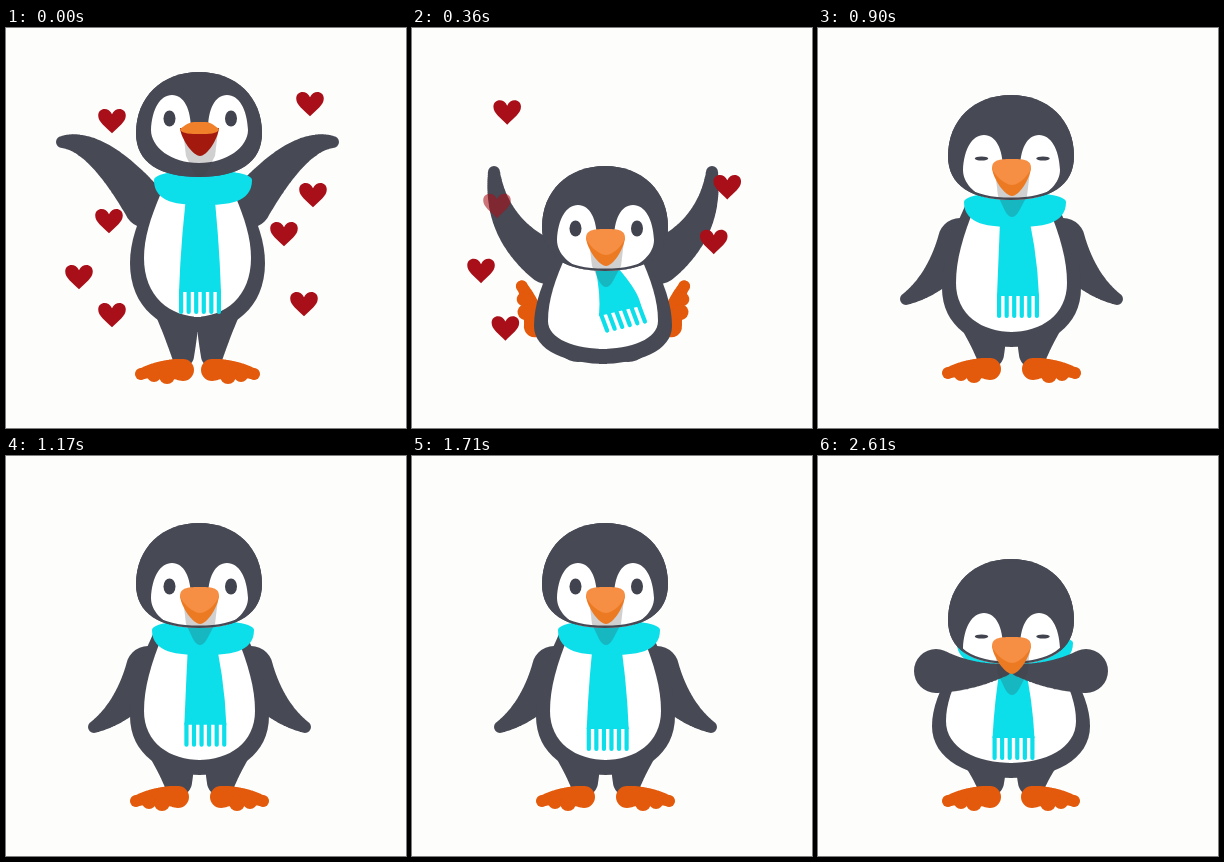
Recreate the animation shown at these times as an HTML page with a canvas. Size 400 by 400 pixels, loop 2700 ms.

```html
<!DOCTYPE html>
<html lang="en">
<head>
<meta charset="utf-8">
<title>Happy penguin</title>
<style>
html, body { margin: 0; width: 100%; height: 100%; overflow: hidden; background: #fdfdfb; }
canvas { display: block; width: 400px; height: 400px; }
</style>
</head>
<body>
<canvas id="stage" width="400" height="400"></canvas>
<script>
const ctx = document.getElementById('stage').getContext('2d');
const LOOP = 2700, STEP = 90;
const PAPER = '#fdfdfb', DARK = '#474955', CYAN = '#0cdeea', FOOT = '#e35a0c', HEART = '#a90f19';

// Key points of the left half, mirrored around `axis`.
const up = {
  axis: [191.5], head: [-23], face: [-40], open: [1], collar: [159, 49],
  shoulder: [145, 165], side: [124, 235], base: [304], ankle: [177, 328, 11],
  arm: [140, 178], bend: [92, 111], hand: [56, 114],
  foot: [159, 343, 0], tail: [194, 264, 0]
};
const tuck = {
  axis: [191], head: [71], face: [70], open: [0], collar: [205, 49],
  shoulder: [145, 225], side: [122, 298], base: [336], ankle: [172, 316, 14],
  arm: [135, 234], bend: [84, 202], hand: [82, 144],
  foot: [118, 281, 1.35], tail: [208, 288, -10]
};
const land = {
  axis: [191.5], head: [59], face: [71], open: [0], collar: [195, 49],
  shoulder: [132, 200], side: [118, 268], base: [318], ankle: [170, 325, 14],
  arm: [136, 226], bend: [112, 270], hand: [64, 281],
  foot: [153, 340, -.17], tail: [187, 297, 0]
};
const idle = {
  axis: [193.5], head: [0], face: [0], open: [0], collar: [181, 51],
  shoulder: [147, 178], side: [124, 260], base: [319], ankle: [172, 326, 14],
  arm: [142, 212], bend: [122, 254], hand: [88, 271],
  foot: [154, 342, 0], tail: [200, 268, 0]
};
const rest = { ...idle, tail: [194, 275, 0] };
const hug = {
  axis: [193], head: [36], face: [50], open: [0], collar: [194, 58],
  shoulder: [135, 210], side: [114, 270], base: [322], ankle: [172, 326, 14],
  arm: [118, 215], bend: [150, 222], hand: [187, 214],
  foot: [154, 342, 0], tail: [195.5, 282, 0]
};
const keys = [[0, up], [360, tuck], [540, land], [810, idle], [900, idle],
  [2160, rest], [2250, rest], [2610, hug], [LOOP, up]];
const blinks = [900, 1440, 2610];

// x, y, drift per second, time of vanishing
const hearts = [
  [106, 93, -30, -24, 660], [304, 76, 30, -27, 300], [307, 167, 23, -22, 690], [278, 206, 66, 22, 500],
  [298, 276, 33, 28, 330], [103, 193, -50, -42, 412], [73, 249, -11, -17, 480], [106, 287, -35, 37, 640]
];

const clamp = v => Math.max(0, Math.min(1, v));
const mix = (a, b, k) => a.map((v, i) => v + (b[i] - v) * k);

function poseAt(t) {
  const i = keys.findIndex(([end]) => end > t);
  const [t0, a] = keys[i - 1], [t1, b] = keys[i];
  const k = (1 - Math.cos(Math.PI * (t - t0) / (t1 - t0))) / 2;
  return Object.fromEntries(Object.keys(a).map(part => [part, mix(a[part], b[part], k)]));
}

function fill(path, color) {
  ctx.fillStyle = color;
  ctx.fill(typeof path === 'string' ? new Path2D(path) : path);
}

function oval(x, y, rx, ry, color) {
  const p = new Path2D();
  p.ellipse(x, y, rx, ry, 0, 0, 7);
  fill(p, color);
}

// Rounded, tapering shape swept along a quadratic curve.
function limb([x0, y0], [x1, y1], [x2, y2], r0, r1, color) {
  const p = new Path2D(), n = 60;
  for (let i = 0; i <= n; i++) {
    const k = i / n, j = 1 - k, r = r0 * j + r1 * k;
    const x = j * j * x0 + 2 * j * k * x1 + k * k * x2;
    const y = j * j * y0 + 2 * j * k * y1 + k * k * y2;
    p.moveTo(x + r, y);
    p.arc(x, y, r, 0, 7);
  }
  fill(p, color);
}

function both(axis, draw) {
  draw();
  ctx.save();
  ctx.translate(2 * axis, 0);
  ctx.scale(-1, 1);
  draw();
  ctx.restore();
}

// Left half of an egg, from shoulder over the widest point to the bottom.
function halfEgg([tx, ty], [sx, sy], bottom, color) {
  const p = new Path2D(), h = sy - ty, mid = 195;
  p.moveTo(mid, ty);
  p.lineTo(tx, ty);
  p.bezierCurveTo(sx + (tx - sx) * .35, ty + h * .4, sx, sy - h * .3, sx, sy);
  p.bezierCurveTo(sx, sy + (bottom - sy) * .65, sx + (mid - sx) * .45, bottom, mid, bottom);
  p.lineTo(mid, ty);
  fill(p, color);
}

function drawBody({ axis, shoulder, side, base, ankle }) {
  const [sx, sy] = shoulder, [wx, wy] = side, [ax, ay, r] = ankle;
  const hip = [ax - 6, base[0] - 25];
  both(axis[0], () => {
    halfEgg(shoulder, side, base[0], DARK);
    limb(hip, [ax - 2, (hip[1] + ay) / 2], [ax, ay], 23, r, DARK);
  });
  both(axis[0], () => halfEgg([sx + 10, sy], [wx + 14, wy - 5], base[0] - 15, '#fff'));
}

function drawFeet({ axis, foot: [x, y, turn] }) {
  both(axis[0], () => {
    ctx.save();
    ctx.translate(x, y);
    ctx.rotate(turn);
    limb([18, -1], [-4, -4], [-24, 3], 11, 5.5, FOOT);
    for (let i = 0; i < 3; i++) oval(-24 + 13 * i, 3 + i, 6 + i, 6 + i, FOOT);
    ctx.restore();
  });
}

function drawArms({ axis, arm, bend, hand }) {
  both(axis[0], () => limb(arm, bend, hand, 22, 6, DARK));
}

function drawTail({ head, tail: [x, bottom, tilt] }) {
  const top = 169 + head[0], mid = (top + bottom) / 2, l = x - 21, r = x + 21, lean = -tilt * .6;
  fill(`M183 ${top}Q${l + 2} ${mid} ${l} ${bottom}L${r} ${bottom + tilt}Q${r - 2} ${mid} 206 ${top}Z`, CYAN);
  ctx.strokeStyle = CYAN;
  ctx.lineWidth = 4.2;
  ctx.lineCap = 'round';
  ctx.beginPath();
  for (let i = 0; i < 6; i++) {
    const k = .05 + i * .18, fx = l + 42 * k, fy = bottom + tilt * k;
    ctx.moveTo(fx, fy - 1);
    ctx.lineTo(fx + lean, fy + 20 + tilt * .5);
  }
  ctx.stroke();
}

function drawCollar([y, rx]) {
  const x = 197, l = x - rx, r = x + rx, h = rx / 2, shoulder = y - 7, bottom = y + 18;
  fill(`M${l} ${shoulder}C${l} ${y + 16} ${x - h} ${bottom} ${x} ${bottom}C${x + h} ${bottom} ${r} ${y + 16} ${r} ${shoulder}C${r} ${y - 20} ${l} ${y - 20} ${l} ${shoulder}Z`, CYAN);
}

function drawBeak(open) {
  const edge = 140 + open, top = 131 + 3 * open, low = 157 - 11 * open, soft = 9 * open;
  fill('M177 143L212 143L209 168L201 183Q194 195 187 183L180 168Z', 'rgba(60,60,65,.24)');
  fill('M174 140C175 151 187 168 194 168C201 168 212 151 213 140Z', open > .4 ? '#a3190d' : '#ec7a22');
  fill(`M174 ${edge}C${174 + soft} ${top} 184 ${top} 194 ${top}C204 ${top} ${213 - soft} ${top} 213 ${edge}C212 ${edge + 5} 202 ${low} 194 ${low}C186 ${low} 175 ${edge + 5} 174 ${edge}Z`,
    open > .4 ? '#f0802a' : '#f68f43');
}

function drawHead(dy, faceDy, open, lid) {
  const skull = new Path2D('M193 67C230 67 256 92 256 128C256 158 232 172 193 172C154 172 130 158 130 128C130 92 156 67 193 67Z');
  ctx.save();
  ctx.translate(0, dy);
  fill(skull, DARK);
  ctx.clip(skull);
  ctx.translate(0, faceDy - dy);
  fill('M145 142C146 121 154 107 166 107C178 107 185 121 185 142L202 142C202 121 209 107 221 107C233 107 241 121 242 142C242 159 221 175 193 175C165 175 145 159 145 142Z', '#fff');
  ctx.translate(0, dy - faceDy);
  ctx.strokeStyle = DARK;
  ctx.lineWidth = 5;
  ctx.stroke(skull);
  ctx.restore();

  ctx.save();
  ctx.translate(0, faceDy);
  for (const x of [163.5, 225]) oval(x, 130.5, 6 + (1 - lid), 8 * lid, '#41434f');
  drawBeak(open);
  ctx.restore();
}

function drawHearts(t) {
  for (const [x, y, vx, vy, end] of hearts) {
    ctx.save();
    ctx.globalAlpha = clamp((end - t) / 90);
    ctx.translate(x + vx * t / 1000, y + vy * t / 1000);
    ctx.scale(1.06, 1.12);
    fill('M0 11C-6 5-13 1-13-5C-13-12-3-13 0-6C3-13 13-12 13-5C13 1 6 5 0 11Z', HEART);
    ctx.restore();
  }
}

function draw(t) {
  const pose = poseAt(t);
  const tucked = pose.foot[2] > .5, hugging = t >= 2430;
  const lid = Math.max(.25, Math.min(1, ...blinks.map(b => Math.abs(t - b) / 90)));

  ctx.fillStyle = PAPER;
  ctx.fillRect(0, 0, 400, 400);
  ctx.save();
  if (t < 360) ctx.translate(0, -50 * Math.sin(Math.PI * t / 360));
  if (tucked) drawFeet(pose);
  if (!hugging) drawArms(pose);
  drawBody(pose);
  if (!tucked) drawFeet(pose);
  drawTail(pose);
  drawCollar(pose.collar);
  if (hugging) drawArms(pose);
  drawHead(pose.head[0], pose.face[0], pose.open[0], lid);
  ctx.restore();
  drawHearts(t);
}

const start = performance.now();
function tick() {
  const t = (performance.now() - start) % LOOP;
  draw(Math.floor(t / STEP) * STEP);
  requestAnimationFrame(tick);
}
tick();
</script>
</body>
</html>
```
